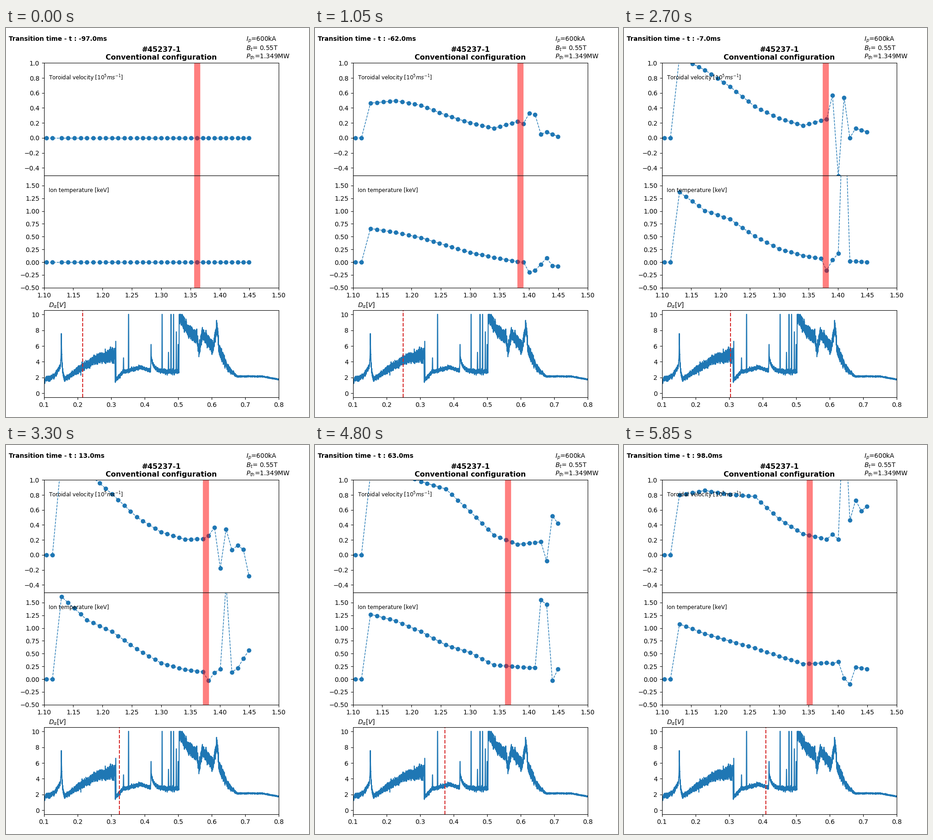
These frames come from a looping animation (660x849 px, 6000 ms). A matplotlib script:

```python
import numpy as np
import matplotlib.pyplot as plt
from matplotlib.animation import FuncAnimation

W, H, DPI = 660, 849, 100
FRAMES, STEP_MS = 40, 150
LEFT, WIDTH = 82.5, 511.5

plt.rcParams["font.family"] = "DejaVu Sans"
fig = plt.figure(figsize=(W / DPI, H / DPI), dpi=DPI)


def panel(top, bottom, xlim, ylim):
    """Axes placed by pixel rows counted from the top of the stage."""
    ax = fig.add_axes([LEFT / W, 1 - bottom / H, WIDTH / W, (bottom - top) / H])
    ax.set(xlim=xlim, ylim=ylim)
    return ax


def label(x, y, text, **style):
    return fig.text(x / W, 1 - y / H, text, fontsize=9.8, **style)


# --- Profiles: a piecewise linear core plus a few edge outliers ---

CHANNELS = np.arange(32)
KNOTS = [0, 4, 8, 12, 16, 20, 24, 31]

# Channel spacing shrinks slightly outwards; two dead channels sit inside.
u = CHANNELS / 31
RADIUS = np.concatenate(([1.1043, 1.1146],
                         1.13 + .3195 * u + .0188 * u * (1 - u)))

keys = []


def profile(core, edge):
    values = np.interp(CHANNELS, KNOTS, core)
    for channel, value in edge.items():
        values[channel] = value
    return np.concatenate(([0, 0], values))


def key(frame, bar, vel, vel_edge, temp, temp_edge):
    keys.append((frame, bar, profile(vel, vel_edge), profile(temp, temp_edge)))


key(7, 1.3849,
    [.465, .495, .435, .305, .2, .13, .22, .02], {26: .33, 27: .31, 28: .05},
    [.66, .58, .48, .33, .19, .09, .01, -.08], {26: -.2, 27: -.16, 29: .08})
key(13, 1.3761,
    [.86, .765, .585, .38, .27, .155, .23, .1], {25: .38, 26: -.98, 28: .03},
    [1.06, .86, .68, .44, .235, .12, -.03, 0], {26: -.25, 27: -.29})
key(18, 1.3791,
    [1.08, .905, .685, .42, .26, .165, .25, .08],
    {25: .57, 26: -.51, 27: .54, 28: 0},
    [1.37, 1.01, .84, .51, .26, .13, .05, 0], {24: -.16, 26: .17, 27: 3.5})
key(26, 1.3716,
    [1.53, 1.3, .94, .59, .345, .25, .18, .1], {24: .26, 30: .04, 31: -.65},
    [1.86, 1.31, 1.02, .67, .37, .24, .2, .3],
    {24: .1, 29: .41, 30: .8, 31: 1.13})
key(32, 1.3643,
    [1.08, 1.11, .98, .88, .58, .265, .14, .2], {29: -.08, 30: .52, 31: .42},
    [1.27, 1.14, .93, .67, .52, .275, .24, .2], {28: 1.55, 29: 1.46, 30: -.03})
key(39, 1.3517,
    [.8, .86, .805, .78, .48, .28, .21, .65], {26: .21, 27: 2.08, 29: .73},
    [1.08, .89, .745, .61, .45, .3, .32, .2], {26: .34, 27: .02, 28: -.1})


def state(frame):
    """Bar position, velocity and temperature for a frame."""
    if frame < keys[0][0]:
        first, bar, vel, temp = keys[0]
        rise = frame / first
        return [1.361 + (bar - 1.361) * rise, vel * rise, temp * rise]
    for a, b in zip(keys, keys[1:]):
        if frame <= b[0]:
            mix = (frame - a[0]) / (b[0] - a[0])
            return [p + (q - p) * mix for p, q in zip(a[1:], b[1:])]


# --- D-alpha trace: mean level, noise envelope and bursts ---

LEVEL = [(.1, 1.4), (.106, 1.8), (.13, 2.1), (.15, 3.5), (.161, 1.8),
         (.2, 2.9), (.25, 4.2), (.312, 5), (.3125, 1.6), (.335, 2.7),
         (.39, 3.3), (.415, 2.9), (.503, 2.7), (.5045, 9.6), (.513, 9.3),
         (.53, 7.9), (.555, 7.1), (.563, 5.3), (.572, 7.5), (.605, 5.8),
         (.6165, 8.6), (.622, 5.6), (.65, 3.1), (.675, 2.15), (.75, 2.15),
         (.8, 1.75)]
NOISE = [(.1, .4), (.17, .35), (.25, .8), (.312, 1.2), (.3125, .3),
         (.503, .35), (.504, 1.1), (.605, 1), (.63, .9), (.66, .35),
         (.68, .12), (.8, .1)]
SPIKES = [(.3142, 6.6), (.3374, 4.5), (.3525, 10.5), (.4195, 6.2),
          (.4525, 10.5), (.4715, 5.2), (.479, 10.5), (.4866, 10.5),
          (.4948, 7.8), (.5003, 6.2), (.5035, 10.5)]
BURSTS = [(.152, 4.3, .0016), (.4195, 1.7, .008)]


def dalpha():
    rng = np.random.default_rng(4)
    t = np.linspace(.1, .8, 7000)
    y = np.interp(t, *zip(*LEVEL))
    y += rng.normal(0, .37, t.size) * np.interp(t, *zip(*NOISE))
    for start, height, decay in BURSTS:
        lag = t - start
        y += height * np.exp(-np.where(lag < 0, -lag / .0008, lag / decay))
    for at, peak in SPIKES:
        shape = np.clip(1.4 - abs(t - at) / .0006, 0, 1)
        y += np.maximum(peak - y, 0) * shape
    return t, np.minimum(y, 10.02)


# --- Stage ---

vel_ax = panel(76.4, 321.6, (1.1, 1.5), (-0.5, 1))
temp_ax = panel(321.6, 566.8, (1.1, 1.5), (-0.5, 1.7))
trace_ax = panel(616.2, 806.3, (.1, .8), (-0.523, 10.523))

vel_ax.set_xticks([])
vel_ax.set_yticks(np.arange(-2, 6) / 5)
temp_ax.set_xticks(np.arange(22, 31) / 20)
temp_ax.set_yticks(np.arange(-2, 7) / 4)
trace_ax.set_yticks(range(0, 11, 2))

vel_ax.set_title("#45237-1\nConventional configuration", fontsize=11.3,
                 fontweight="bold", linespacing=1.15, pad=5.3)
for ax, text in ((vel_ax, "Toroidal velocity [$10^5ms^{-1}$]"),
                 (temp_ax, "Ion temperature [keV]")):
    ax.text(.02, .85, text, transform=ax.transAxes, fontsize=8.5)

clock = label(6, 28, "", weight="bold")
label(522.7, 29, "$I_p$=600kA")
label(522.7, 49, "$B_t$= 0.55T")
label(522.7, 67, "$P_{th}$=1.349MW")
label(92.7, 609, r"$D_{\alpha}[V]$")

lines, bars = [], []
for ax in (vel_ax, temp_ax):
    lines += ax.plot(RADIUS, 0 * RADIUS, "o--", color="C0", lw=1)
    bars.append(ax.axvline(1.361, color="r", alpha=.5, lw=9.6))

trace_ax.plot(*dalpha(), color="C0")
cursor = trace_ax.axvline(.215, color="C3", ls="--")


def update(frame):
    bar, *profiles = state(frame)
    for line, values in zip(lines, profiles):
        line.set_ydata(values)
    for mark in bars:
        mark.set_xdata([bar, bar])
    now = .215 + .005 * frame
    cursor.set_xdata([now, now])
    clock.set_text(f"Transition time - t : {5 * frame - 97:.1f}ms")
    return [*lines, *bars, cursor, clock]


anim = FuncAnimation(fig, update, frames=FRAMES, interval=STEP_MS,
                     init_func=lambda: update(0), repeat=True)
plt.show()
```
